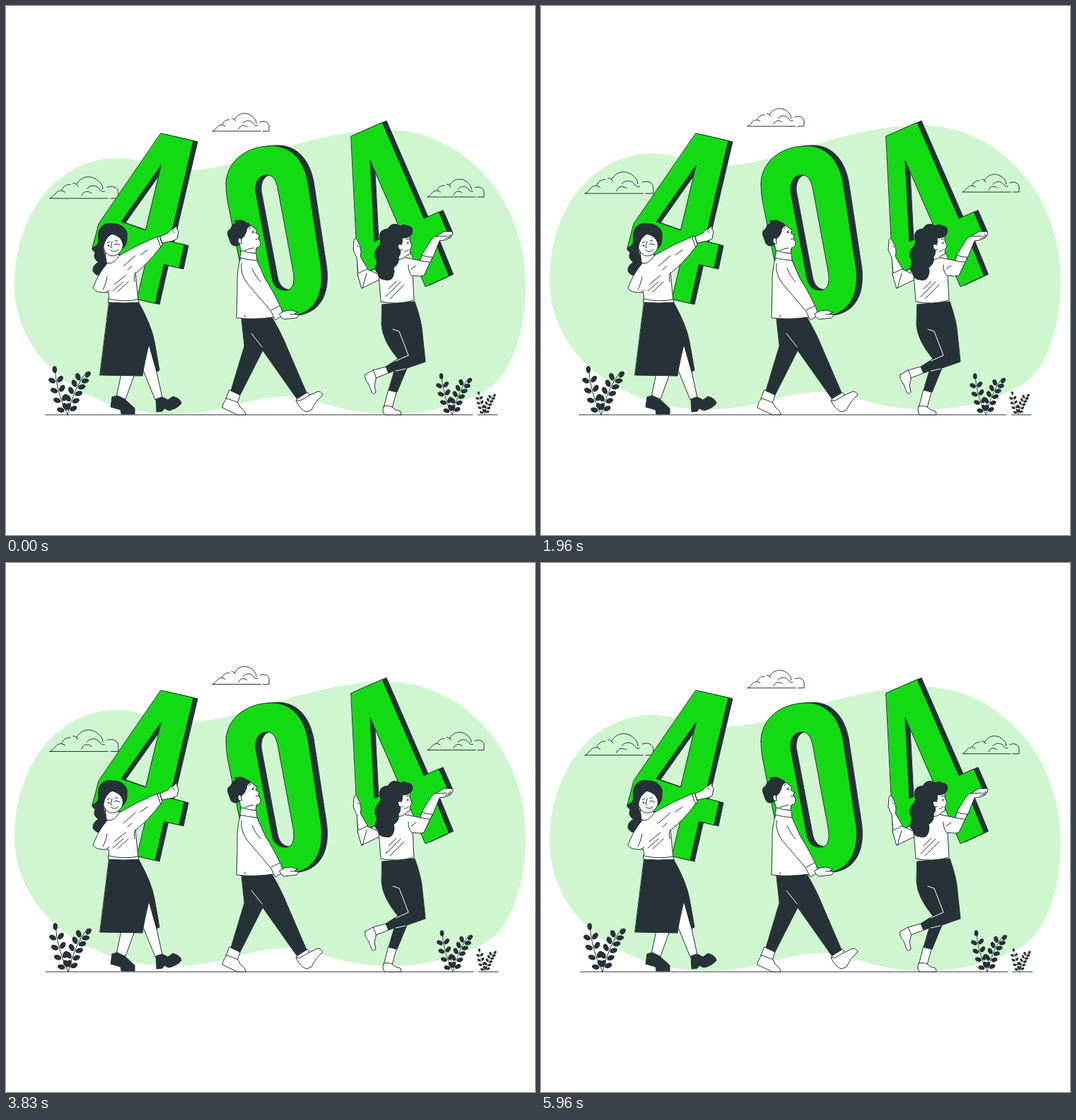
Write an HTML page that moves like this. It is 748 px wide and 748 px high and loops after 6 s.

```html
<!DOCTYPE html>
<html lang="en">
<head>
<meta charset="utf-8">
<title>404</title>
<style>
html, body { margin: 0; width: 100%; height: 100%; overflow: hidden; background: #fff; }
svg { display: block; width: 100vw; height: 100vh; stroke-linecap: round; stroke-linejoin: round; }
.w { fill: #fff; stroke: #263238; }
.d { fill: #263238; stroke: #263238; }
.l { fill: none; stroke: #263238; }
.v { fill: none; stroke: #fff; }
.g { fill: #13db13; stroke: #263238; fill-rule: evenodd; }
.s { fill: #263238; stroke: #263238; fill-rule: evenodd; }
</style>
</head>
<body>
<svg viewBox="0 0 748 748">
<defs>
  <path id="cloud" class="l" vector-effect="non-scaling-stroke" d="M0 0H68M71 0H80V-7C80-12 74-16 67-13M0 0C5-1 6-9 13-9Q16-9 18-7M14-10C16-15 21-17 24-16M27-18Q31-18 33-14M31-16C37-28 52-28 60-17Q62-14 62-11M37-3C39-9 45-9 49-6M43-11C47-16 54-16 58-11Q60-7 64-8"/>
  <g id="plant"></g>
  <path id="four1" d="M219 180L265 190.500L231.500 332.500L252 337.500L245 370.500L223.500 365.500L211 420.500L185 414.500L198 360L122 342L131 308ZM219 226L163 305L197 317Z"/>
  <path id="zero" d="M311 252C311 222 337 199 372 198C403 196 421 218 427 249L445.500 370C450 407 437 434 405 438C369 442 342 424 336 390L313 275Q311 263 311 252ZM353 262C352 247 359 239 369 239C379 239 383 249 385 262L406 375C409 392 405 402 395 402C384 402 378 395 376 384Z"/>
  <path id="four2" d="M488 184L532 164.500L591 300.500L612 291L625.500 322L606 331L626.500 381.500L593 397L572 348L498 382ZM515 219L521 333L557 316Z"/>
</defs>

<path id="blob" fill="#d0f6d0" d="M12 393C13 290 75 215 158 215C190 215 215 233 262 232C320 230 385 200 440 188C475 180 505 175 540 175C650 177 735 275 735 395C735 460 715 525 675 546C640 562 600 577 545 577C470 577 440 553 400 552C340 552 310 577 235 577C115 577 12 502 12 393Z"/>

<g id="clouds">
  <use href="#cloud" x="292" y="177"/>
  <use href="#cloud" x="596" y="270"/>
  <use href="#cloud" transform="translate(62 272) scale(1.21)"/>
</g>

<g id="ground">
  <path class="l" d="M55.500 578H660M667 578H695"/>
  <use href="#plant" transform="translate(87 578)"/>
  <use href="#plant" transform="translate(631 578) scale(.85)"/>
  <use href="#plant" transform="translate(677 578) scale(.48)"/>
</g>

<use href="#four1" class="s" x="6" y="1.400"/><use href="#four1" class="g"/>
<use href="#zero" class="s" x="8" y="-.8"/><use href="#zero" class="g"/>
<use href="#four2" class="s" x="6" y="-2.200"/><use href="#four2" class="g"/>

<!-- woman with a skirt -->
<g>
  <path class="w" d="M163 520L156 553L169 556L182 520ZM202 478L194 515L211 557L221 554L213 517Z"/>
  <path class="d" d="M150 553L148 567L162 571L163 577H182V569L168 556L158 551ZM212 556L213 574L221 573L224 569L230 572Q241 570 248 562Q247 555 236 552L229 557L221 553Z"/>
  <path class="d" d="M146 418H187Q206 452 210 475L217 515L213 517L202 478Q195 500 193 523L133 522Z"/>
  <path class="d" d="M136 342Q124 344 125 355Q128 362 131 362Q122 367 123 375Q128 383 135 380Q145 375 145 367Z"/>
  <path class="w" d="M143 364Q130 379 123 399Q126 406 145 405L146 418L187 417L183 378Q202 363 219 340L214 326Q185 338 160 353Z"/>
  <path class="w" d="M145 414Q165 419 187 415L188 419Q166 421 145 419ZM214 327L217 325L221 337L219 341ZM218 326L229 321Q231 316 237 315L241 311L242 316L244 319L242 329L236 332L221 335Z"/>
  <path class="l" d="M235 317L238 321M143 383Q141 394 137 401M183 377Q180 382 182 390M153 394L169 381M151 403L166 390M158 404L173 390M166 368L183 353M190 352L200 345M172 373L178 368M142 404L146 402"/>
  <path class="w" d="M140 346L142 363Q152 367 160 353L157 348Z"/>
  <path class="w" d="M137 326Q135 349 147 353Q157 355 163 346Q168 338 164 326Q150 319 137 326Z"/>
  <path class="d" d="M131 329C128 312 142 305 151 308C164 307 173 318 171 325C172 333 169 340 165 343Q167 334 160 327Q154 323 150 322Q140 328 138 340Q136 350 129 350Q120 345 122 342Q132 339 131 329Z"/>
  <path class="l" d="M148 345Q154 350 159 344M153 337Q157 335 161 338M150 333L148 341L150 342M143 335L147 333M154 332L158 332"/>
  <circle class="d" cx="145" cy="339" r=".8"/>
</g>

<!-- man -->
<g>
  <path class="w" d="M316 543L331 550L327 562L311 556ZM411 556L426 546L431 553L416 562Z"/>
  <path class="w" d="M312 555Q306 562 306 568L327 578H339Q339 573 331 567L328 561ZM410 558Q416 571 425 574L432 571Q438 558 448 550Q446 545 441 545L428 551L416 558Z"/>
  <path class="d" d="M333 440H376Q390 464 397 482L425 547L411 555L363 487L331 550L318 544L337 481Z"/>
  <path class="v" d="M347 463L362 482"/>
  <path class="w" d="M332 355Q326 374 327 398L326 441Q350 444 378 440L381 444L392 437L389 427Q376 400 367 387L355 360Z"/>
  <path class="w" d="M387 435L395 431L403 430L413 433L408 435L414 437L411 441L393 443L389 440Z"/>
  <path class="l" d="M333 364Q331 378 341 392L375 432L379 441M375 430L387 424M348 371Q353 383 360 390M402 436L410 436M338 437V440"/>
  <path class="w" d="M329 333L333 348L353 350L354 342Q360 342 360 334L357 329L358 324L353 321L355 316Q351 316 347 310L336 313Z"/>
  <path class="w" d="M333 346Q342 349 354 350L355 360Q342 359 331 356Z"/>
  <path class="d" d="M327 306L323 304Q334 301 339 306Q345 307 345 311Q340 313 340 319Q337 327 333 329Q332 339 325 339Q318 340 316 330Q312 323 314 318Q319 315 320 310Q323 307 327 306Z"/>
  <path class="w" d="M332 329Q329 326 328 331Q328 337 333 336Z"/>
  <path class="l" d="M348 319L351 317M343 315L347 312M353 330L357 329M337 346Q344 343 350 342"/>
  <circle class="d" cx="349" cy="320" r=".8"/>
</g>

<!-- woman with long hair -->
<g>
  <path class="w" d="M519 515L537 510L541 519L523 526ZM541 543L552 546L546 568L535 566Z"/>
  <path class="w" d="M508 521L519 515Q524 524 523 528L521 536L523 546Q519 550 517 546L513 535Q506 527 508 521ZM534 566Q540 564 546 567Q550 572 558 573L559 578H536Q531 574 534 566Z"/>
  <path class="d" d="M532 422L578 418Q588 446 589 465L593 503L567 512L553 546L541 543L549 516L541 519L537 510L554 499Q532 472 531 451Z"/>
  <path class="v" d="M547 457L556 460L569 494L551 502M551 516L565 513"/>
  <path class="w" d="M498 379L496 356L491 345L492 331Q494 326 497 332L501 340Q503 349 501 354L512 373Z"/>
  <path class="w" d="M497 378Q504 376 510 372L528 380L528 387L503 399Z"/>
  <path class="w" d="M588 352L601 331Q604 326 611 324L619 319L631 319L632 322L628 328Q620 332 613 332L603 357Z"/>
  <path class="w" d="M527 380L530 418Q553 423 577 416L575 381Q586 383 591 381L601 359L586 360L560 355L545 366Z"/>
  <path class="w" d="M586 360L588 352Q596 356 603 355L600 362Z"/>
  <path class="l" d="M574 382Q568 374 569 366M537 411L558 390M543 414L563 394M541 400L552 389M580 367L573 372M504 399L510 378M608 326L623 325M621 329L629 323M625 328L631 324M497 339L500 341"/>
  <path class="w" d="M554 339L551 358Q561 360 567 352Q573 352 571 345L574 339L571 332V323L558 323Z"/>
  <path class="d" d="M560 328Q570 329 574 322Q577 312 568 311Q561 308 558 311Q546 304 540 315Q527 316 528 328Q532 334 527 340Q520 347 522 355Q526 361 523 367Q520 374 526 378Q526 386 535 387Q546 390 548 380Q550 375 548 370Q557 364 555 355Q560 348 556 342Q562 336 560 328Z"/>
  <path class="w" d="M558 337Q553 336 555 342Q557 347 561 344"/>
  <path class="l" d="M563 347Q567 348 569 344M566 330L570 329"/>
  <circle class="d" cx="568" cy="335" r=".8"/>
</g>
</svg>
<script>
const el = id => document.getElementById(id);

// A stem is a quadratic curve (0,0) - c - e with paired leaves along it.
function stem(cx, cy, ex, ey, pairs) {
  const point = t => [2 * t * (1 - t) * cx + t * t * ex, 2 * t * (1 - t) * cy + t * t * ey];
  const leaf = (x, y, angle, size) =>
    `<ellipse fill="#263238" cx="${size}" rx="${size}" ry="${size * .66}" ` +
    `transform="translate(${x} ${y}) rotate(${angle})"/>`;
  let out = `<path class="l" d="M0 0Q${cx} ${cy} ${ex} ${ey}"/>`;
  for (let i = 0; i < pairs; i++) {
    const t = .08 + i * .8 / pairs, [x, y] = point(t), [u, v] = point(t + .02);
    const dir = Math.atan2(v - y, u - x) * 180 / Math.PI;
    for (const side of [-1, 1]) {
      const a = (dir + side * 58) * Math.PI / 180;
      out += leaf(x + 2 * Math.cos(a), y + 2 * Math.sin(a), dir + side * 50, 5.4);
    }
  }
  const tip = Math.atan2(ey - cy, ex - cx) * 180 / Math.PI;
  return out + leaf(ex - 2 * Math.cos(tip * Math.PI / 180), ey + 8, tip, 5);
}
el('plant').innerHTML = stem(-16, -32, -18, -67, 4) + stem(9, -38, 27, -61, 5);

const rise = p => -10 * (1 - Math.abs(1 - 2 * (p % 1)));
const sway = [0, -1, 2, -4, 4, -4, 4, -4, 2, -1, 0];
const move = (id, x, y) => el(id).setAttribute('transform', `translate(${x} ${y})`);

function draw() {
  const p = performance.now() % 6000 / 6000, i = Math.floor(p * 10);
  move('blob', 0, rise(p));
  move('clouds', 0, rise(p * 2));
  move('ground', sway[i] + (sway[i + 1] - sway[i]) * (p * 10 - i), 0);
  requestAnimationFrame(draw);
}
draw();
</script>
</body>
</html>
```
